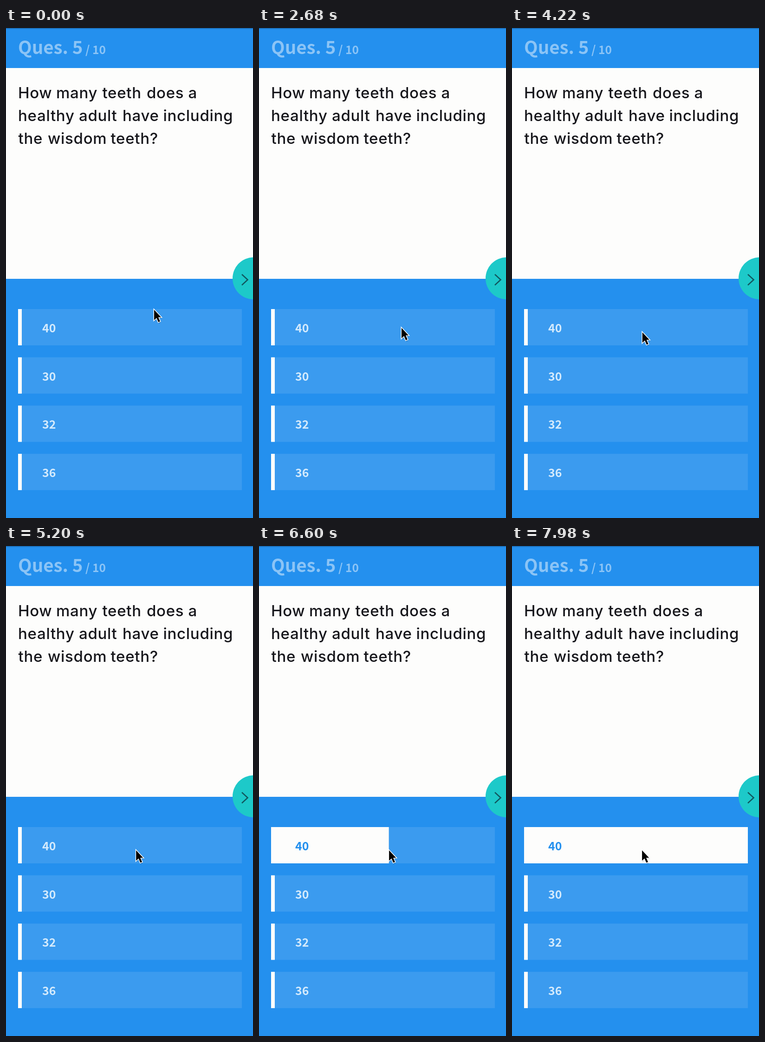
An HTML page for the animation above (8 s loop, 532 by 1053 pixels).

```html
<!DOCTYPE html>
<html lang="en">
<head>
<meta charset="utf-8">
<title>Quiz</title>
<style>
  html, body { margin: 0; width: 100%; height: 100%; overflow: hidden; background: #2490ee; }
  svg { display: block; width: 100%; height: 100%; }
  .ui { font-family: "Noto Sans CJK JP", "Noto Sans CJK SC", "Noto Sans CJK", "Open Sans", sans-serif; font-weight: 700; }
  .ask { font: 500 33px Inter, "Noto Sans", sans-serif; letter-spacing: .7px; fill: #17171c; }
</style>
</head>
<body>
<svg viewBox="0 0 532 1053" preserveAspectRatio="none">
  <rect width="532" height="1053" fill="#2490ee"/>
  <rect width="532" height="2" fill="#1c70ba"/>
  <g class="ui" fill="#8bc4f6">
    <text x="26" y="56" font-size="38.5">Ques. 5</text>
    <text x="171" y="56" font-size="24.5">/ 10</text>
  </g>
  <rect y="86" width="532" height="453" fill="#fdfdfc"/>
  <g class="ask" id="ask"></g>
  <circle cx="533.3" cy="538" r="45.3" fill="#1dc9c9"/>
  <path d="M508 529.5L520.5 541L508 552.5" fill="none" stroke="#11585f" stroke-width="2.6"/>
  <g class="ui" id="options" font-size="25"></g>
  <g id="cursor">
    <path d="M1 2.5V26L6.4 20.8L10.4 30.2L15 28.2L11 19H18Z" fill="#000" opacity=".18" transform="translate(.6 1.6)"/>
    <path d="M1 2.2V24.5L6.3 19.6L10.2 28.7L13.9 27.1L10 18.1H16Z" fill="#000" stroke="#fff"
          stroke-width="2.8" stroke-linejoin="miter" paint-order="stroke"/>
  </g>
</svg>
<script>
const LOOP = 8000, CLICK = 6480, FILL = 400;
const NS = "http://www.w3.org/2000/svg";
const $ = id => document.getElementById(id);

function add(parent, tag, attrs, text) {
  const el = document.createElementNS(NS, tag);
  for (const k in attrs) el.setAttribute(k, attrs[k]);
  if (text) el.textContent = text;
  parent.appendChild(el);
  return el;
}

// Each word: [text, x]
[
  [["How", 26], ["many", 108], ["teeth", 207.5], ["does", 303], ["a", 392.5]],
  [["healthy", 26], ["adult", 157], ["have", 251], ["including", 338.5]],
  [["the", 26.5], ["wisdom", 90], ["teeth?", 225.5]]
].forEach((line, row) => line.forEach(([word, x]) =>
  add($("ask"), "text", { x, y: 150.5 + row * 49 }, word)));

const options = ["40", "30", "32", "36"].map((label, i) => {
  const y = 604 + i * 103.7, box = { x: 26, y, height: 78 };
  add($("options"), "rect", { ...box, width: 482, fill: "#3b9bef" });
  return {
    bar: add($("options"), "rect", { ...box, width: 8, fill: "#fdfdfc" }),
    text: add($("options"), "text", { x: 78, y: y + 50, fill: "#d3eafc" }, label)
  };
});

const clamp = p => Math.min(1, Math.max(0, p));

// cubic-bezier(.25, .1, .25, 1)
function ease(p) {
  let lo = 0, hi = 1, s = p;
  for (let i = 0; i < 20; i++) {
    s = (lo + hi) / 2;
    const x = .75 * s * (1 - s) + s ** 3;
    if (x < p) lo = s; else hi = s;
  }
  return .3 * s * (1 - s) ** 2 + 3 * s * s * (1 - s) + s ** 3;
}
const smooth = p => p * p * (3 - 2 * p);

// Pointer path: [start, end, dx, dy]
const moves = [[0, 700, -12, 39], [3000, 3700, -26.2, 9.5], [4900, 5300, -.7, 0]];

function draw(t) {
  let x = 318, y = 603.3;
  for (const [a, b, dx, dy] of moves) {
    const p = smooth(clamp((t - a) / (b - a)));
    x += dx * p;
    y += dy * p;
  }
  $("cursor").setAttribute("transform", `translate(${x} ${y})`);

  const p = clamp((t - CLICK) / FILL);
  options[0].bar.setAttribute("width", 8 + 474 * (p > 0 && p < 1 ? ease(p) : p));
  options[0].text.setAttribute("fill", t >= CLICK ? "#2490ee" : "#d3eafc");
}

const start = performance.now();
function tick() {
  draw((performance.now() - start) % LOOP);
  requestAnimationFrame(tick);
}
draw(0);
requestAnimationFrame(tick);
</script>
</body>
</html>
```
